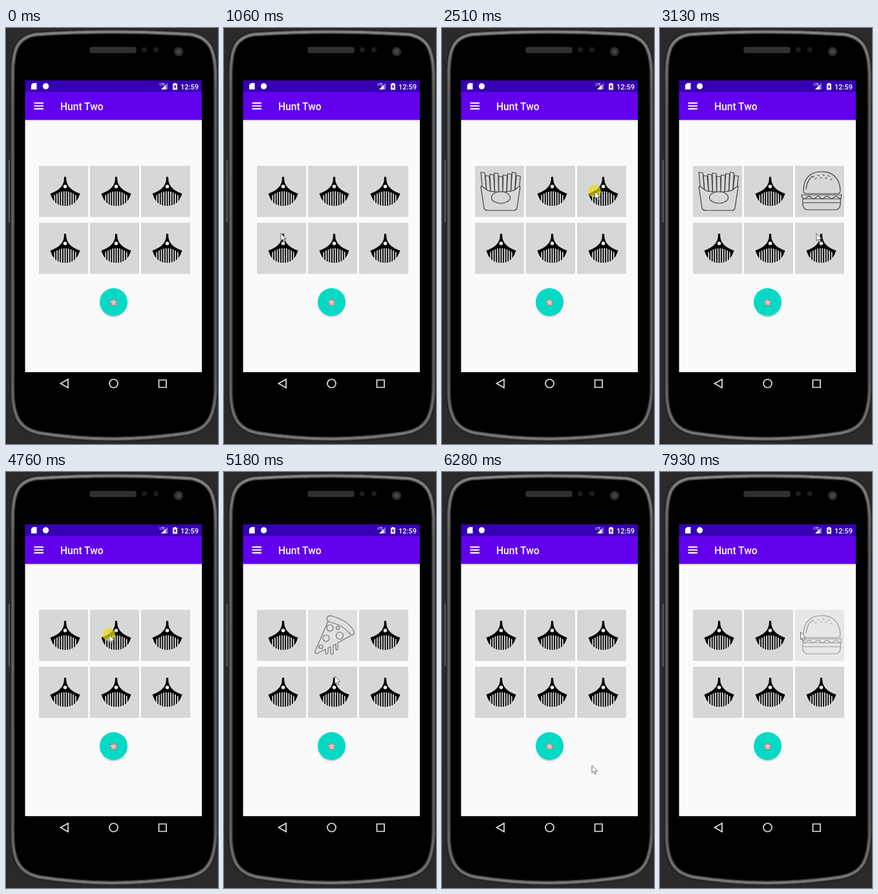
These frames come from a looping animation (328x643 px, 8000 ms). An HTML page:

```html
<!DOCTYPE html>
<html lang="en">
<head>
<meta charset="utf-8">
<title>Hunt Two</title>
<style>
html, body { margin: 0; width: 100%; height: 100%; overflow: hidden; background: #2a2a2a; }
svg { display: block; width: 328px; height: 643px; font-family: Roboto, sans-serif; font-weight: 500; }
.line { fill: #d6d7d7; stroke: #404040; stroke-width: 1.2; stroke-linejoin: round; stroke-linecap: round; }
</style>
</head>
<body>
<svg viewBox="0 0 328 643">
  <defs>
    <linearGradient id="rim" x2="0" y2="1">
      <stop stop-color="#9a9a9a"/><stop offset=".15" stop-color="#6c6c6c"/>
      <stop offset=".85" stop-color="#686868"/><stop offset="1" stop-color="#8c8c8c"/>
    </linearGradient>
    <filter id="soft" x="-30%" y="-30%" width="160%" height="160%"><feGaussianBlur stdDeviation="1.2"/></filter>
    <path id="body" d="M10.500 70C11 32 18 15 46 10Q165 2 286 10C314 15 323 32 324 70V562C322 602 312 620 280 626Q165 644 52 626C22 620 11 602 10.500 562Z"/>

    <g id="comb">
      <path d="M39 17H42L42.500 24C45 35 55 40 63.500 43L61.500 48Q56 62 40.500 62T19.500 48L17.500 43C26 40 36 35 38.500 24Z"/>
      <circle cx="40.500" cy="32" r="2.800" fill="#eee"/>
      <path id="gaps" stroke="#dcdcdc" stroke-width="1.800" stroke-linecap="round"/>
    </g>
    <g id="fries" class="line">
      <path id="sticks"/>
      <path d="M9 32C14 31 16 38 22 39Q39 42 57 39C64 38 66 31 70 32L65 65Q64 69 60 69H20Q15 69 14 65Z"/>
      <ellipse cx="40" cy="49" rx="14.500" ry="9"/>
    </g>
    <g id="burger" class="line">
      <path d="M12 51H70Q72 68 62 68H20Q10 68 12 51ZM13 57H69"/>
      <path id="lettuce"/>
      <path d="M13 38C13 18 25 9 41 9S69 18 70 38Q70 43 66 43H17Q13 43 13 38Z"/>
      <path d="M17 36C18 25 23 18 28 16"/>
      <path id="seeds"/>
    </g>
    <g id="pizza" class="line">
      <path d="M31 18L11 64Q10 69 15 67L27 61V67Q29 70 31 66V59L35 57V67Q37 72 39 67V55L43 53V61Q45 64 46 60V51L66 40"/>
      <path d="M30 11Q33 8 38 10 60 16 70 31 72 35 70 38 67 41 65 37 53 23 34 19 29 18 29 14Z"/>
      <circle cx="34" cy="28" r="5"/><circle cx="49" cy="40" r="5.500"/>
      <circle cx="28" cy="44" r="5"/><circle cx="46" cy="28" r="2.500"/><circle cx="20" cy="57" r="3"/>
    </g>
  </defs>

  <rect x="3.500" y="203" width="5" height="98" rx="2" fill="#555"/>
  <rect x="324.500" y="140" width="6" height="45" rx="2" fill="#777"/>
  <use href="#body" fill="none" stroke="#141414" stroke-width="9"/>
  <g filter="url(#soft)">
    <use href="#body" fill="none" stroke="#444" stroke-width="6"/>
    <use href="#body" fill="#000" stroke="url(#rim)" stroke-width="3"/>
  </g>
  <rect x="130" y="30" width="71" height="8" rx="2" fill="#2e2e2e" stroke="#404040"/>
  <g fill="#1c1c1c"><circle cx="214" cy="33.500" r="4"/><circle cx="232" cy="33.500" r="4"/></g>
  <circle cx="267" cy="36.500" r="7" fill="#2e2e2e"/><circle cx="267" cy="36.500" r="3.500" fill="#454545"/>

  <path fill="#fafafa" d="M29.500 142H303V532H29.500Z"/>
  <path fill="#000" opacity=".13" d="M29.500 142H303V144H29.500Z"/>
  <path fill="#3700b3" d="M29.500 81H303V99H29.500Z"/>
  <path fill="#6200ee" d="M29.500 99H303V142H29.500Z"/>
  <g fill="#fff">
    <path d="M42 85H47.500V95H39V88Z"/>
    <circle cx="61.500" cy="90" r="4.700"/>
    <path d="M250 85V95H240Z" opacity=".45"/><path d="M247 88V95H240Z"/>
    <text x="237.500" y="89" font-size="5">LTE</text>
    <path d="M258 86H260V85H263V86H265V95.500H258Z"/>
    <path fill="#3700b3" d="M262 87L259.500 91.500H261V94.500L263.500 90H262Z"/>
    <text x="270" y="94.500" font-size="11">12:59</text>
    <path stroke="#fff" stroke-width="1.800" d="M43.500 116H58M43.500 120.500H58M43.500 125H58"/>
    <text x="84" y="126.800" font-size="15.600">Hunt Two</text>
  </g>

  <g id="cards"></g>

  <circle cx="166.500" cy="426" r="20.500" opacity=".25" filter="url(#soft)"/>
  <circle cx="166.500" cy="423.500" r="21.500" fill="#03dac5"/>
  <path id="star" fill="#e8c0bc" stroke="#8c8280" stroke-linejoin="round"/>

  <g fill="none" stroke="#e4e4e4" stroke-width="1.700">
    <path d="M84.500 549.500L96 543V556Z"/><circle cx="166.500" cy="549.500" r="6.500"/><path d="M236.500 544H248V555.500H236.500Z"/>
  </g>

  <g id="cursor">
    <circle id="tap" r="10" fill="#e8de10" opacity=".72"/>
    <path fill="#fff" stroke="#555" stroke-width=".9" d="M.5 .5V12L3.200 9.600 5 14 7 13.200 5.200 9H8.800Z"/>
  </g>
</svg>
<script>
const LOOP = 8000, FADE_DELAY = 120, FADE = 450, TURN_BACK = 625, TAP_PAUSE = 260;
const $ = id => document.getElementById(id);
const repeat = (n, f) => Array.from({ length: n }, (_, i) => f(i)).join('');
const shape = (id, d) => $(id).setAttribute('d', d);

// Each move runs from start to end and brings the cursor to (x, y).
// With a card, the cursor first taps it and it shows its face.
const moves = [
  { start: 190, end: 460, x: 91, y: 459 },
  { start: 920, end: 1340, x: 86, y: 251 },
  { start: 1670, end: 2440, x: 236, y: 252, card: 0, face: 'fries' },
  { start: 2510, end: 3290, x: 242, y: 322, card: 2, face: 'burger' },
  { start: 3620, end: 3900, x: 159, y: 251 },
  { start: 4760, end: 5520, x: 178, y: 354, card: 1, face: 'pizza' },
  { start: 5650, end: 6420, x: 232, y: 454, card: 4, face: 'burger' },
  { start: 6490, end: 6850, x: 217, y: 247 },
  { start: 7580, end: 7930, x: 191, y: 294, card: 2, face: 'burger' },
];
const entry = { x: 213, y: 547 };

// Every second tap ends a pair, and both its cards turn back together.
const taps = moves.filter(m => m.face);
taps.forEach((m, i) => {
  const second = taps[i | 1];
  m.back = second ? second.start + TURN_BACK : LOOP;
});

shape('gaps', repeat(10, i => {
  const d = (i - 4.5) * 3.6;
  return `M${40.5 + d} ${40 + d * d / 45}V${63 - d * d / 45}`;
}));
shape('sticks', repeat(9, i => {
  const x = 15 + i * 6.2, top = 10 + i * 5 % 7, lean = (x - 40) / 9;
  return `M${x - 3} 42L${x - 3 + lean} ${top}L${x + 3 + lean} ${top + 1}L${x + 3} 42Z`;
}));
shape('lettuce', 'M10 45' + repeat(31, i => `L${11 + i * 2} ${49 + 2 * Math.sin(i * .9)}`) + 'L72 45Z');
shape('seeds', repeat(8, i => {
  const x = 27 + i * 4;
  return `M${x} ${14 + i % 2 * 5 + (x - 41) ** 2 / 80}l2 ${i % 2 ? -1 : 1}`;
}));
shape('star', repeat(10, i => {
  const a = i * Math.PI / 5, r = i % 2 ? 3.6 : 7;
  return `${i ? 'L' : 'M'}${166.5 + r * Math.sin(a)} ${424.3 - r * Math.cos(a)}`;
}) + 'Z');

$('cards').innerHTML = repeat(6, i =>
  `<g transform="translate(${51 + i % 3 * 79} ${i < 3 ? 213 : 301})">
    <rect width="76" height="79" rx="1" fill="#d6d7d7"/><use/></g>`);
const cards = [...$('cards').children];

function snap(t, { start, end }) {
  const step = (end - start) / Math.round((end - start) / 70);
  return Math.min(end, start + Math.floor((t - start) / step + .01) * step);
}

function drawCards(t) {
  cards.forEach((card, i) => {
    const m = taps.find(m => m.card === i && t >= m.start + FADE_DELAY && t < m.back);
    const u = m ? Math.min(1, (t - m.start - FADE_DELAY) / FADE) : 1;
    card.setAttribute('opacity', (1 - Math.cos(Math.PI * u)) / 2);
    card.lastElementChild.setAttribute('href', '#' + (m ? m.face : 'comb'));
  });
}

function drawCursor(t, k) {
  $('cursor').style.display = k < 0 ? 'none' : '';
  if (k < 0) return;
  const m = moves[k], from = moves[k - 1] || entry;
  const start = m.start + (m.face ? TAP_PAUSE : 0);
  const u = Math.max(0, Math.min(1, (t - start) / (m.end - 100 - start)));
  const e = u * (2 - u);
  $('cursor').setAttribute('transform',
    `translate(${from.x + (m.x - from.x) * e} ${from.y + (m.y - from.y) * e})`);
  $('tap').style.display = m.face && t < m.start + FADE_DELAY ? '' : 'none';
}

const origin = performance.now();
function tick() {
  const time = (performance.now() - origin) % LOOP;
  const k = moves.findLastIndex(m => m.start <= time);
  const t = k < 0 ? time : snap(time, moves[k]);
  drawCards(t);
  drawCursor(t, k);
  requestAnimationFrame(tick);
}
tick();
</script>
</body>
</html>
```
